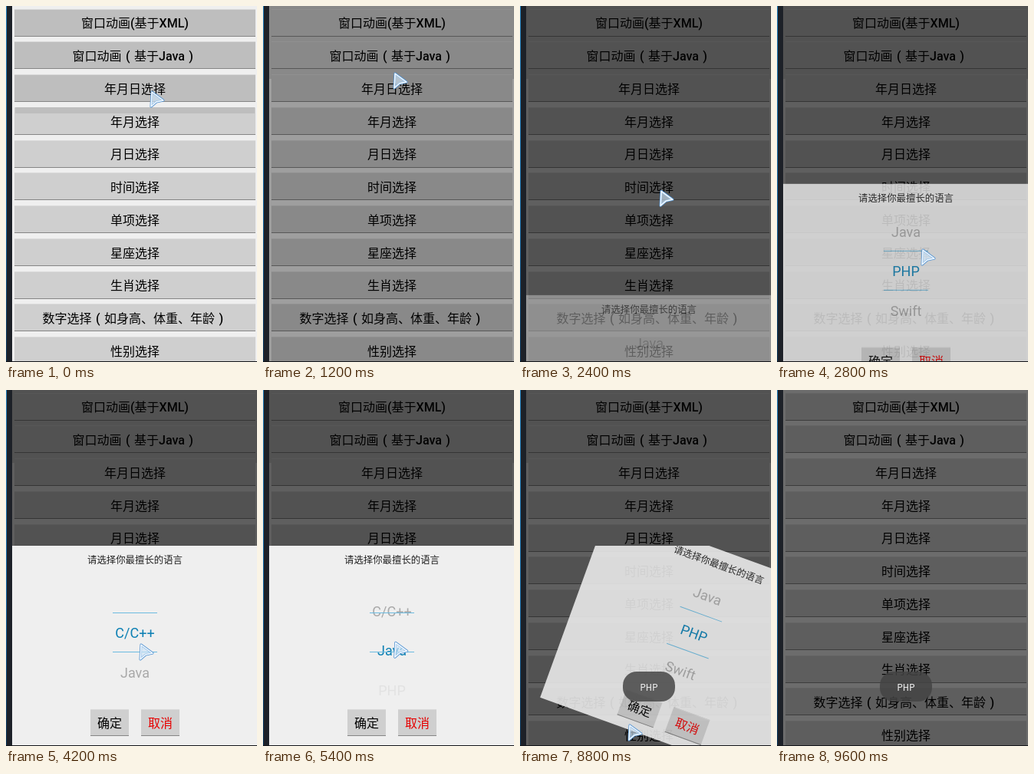
Write an HTML page with a canvas that moves like this. It is 327x464 px and loops after 9.8 s.

```html
<!DOCTYPE html>
<html lang="zh-CN">
<head>
<meta charset="utf-8">
<style>
html, body { margin: 0; width: 100%; height: 100%; overflow: hidden; background: #1d2128 }
canvas { display: block }
</style>
</head>
<body>
<canvas id="stage" width="327" height="464"></canvas>
<script>
const W = 327, H = 464, LOOP = 9800, STEP = 200;
const stage = document.getElementById('stage').getContext('2d');
const sheet = Object.assign(document.createElement('canvas'), { width: W, height: H }).getContext('2d');
const SANS = 'Roboto, "Noto Sans CJK SC", "Noto Sans CJK", sans-serif';
const menu = ['窗口动画(基于XML)', '窗口动画（基于Java）', '年月日选择', '年月选择', '月日选择',
  '时间选择', '单项选择', '星座选择', '生肖选择', '数字选择（如身高、体重、年龄）', '性别选择'];
const langs = ['C/C++', 'Java', 'PHP', 'Swift'];

// Pointer stops: time, x, y
const stops = [[0, 190, 111], [600, 172, 87], [1600, 172, 87], [2800, 190, 317], [4200, 176, 331],
  [6800, 169, 294], [7400, 143, 436], [8800, 143, 436], [9400, 150, 470]];

const clamp = v => Math.max(0, Math.min(1, v));
const ramp = (t, from, to) => clamp((t - from) / (to - from));

// Index of the language in the middle of the wheel
const wheelAt = t => 2 - 2 * ramp(t, 3300, 4200) + ramp(t, 4900, 5800) + ramp(t, 6150, 7000);

function pointerAt(t) {
  const i = stops.findIndex(s => s[0] > t);
  const [t0, x0, y0] = stops[i - 1], [t1, x1, y1] = stops[i], p = ramp(t, t0, t1);
  // Two upward drags, each after moving back down
  const drag = 60 * Math.abs(Math.sin(2 * Math.PI * ramp(t, 4200, 6800)));
  return [x0 + (x1 - x0) * p, y0 + (y1 - y0) * p + drag];
}

function rect(g, x, y, w, h, color) {
  g.fillStyle = color;
  g.fillRect(x, y, w, h);
}

function label(g, str, x, y, size, color, weight = 500, family = SANS) {
  g.font = `${weight} ${size}px ${family}`;
  g.textAlign = 'center';
  g.fillStyle = color;
  // Wide brackets are centred in their cell
  const text = str.replace('（', '\u2004(\u2004').replace('）', '\u2004)\u2004');
  g.fillText(text, x, y + size * .36);
}

function button(g, x, y, w, h, color) {
  rect(g, x, y, w, h, color);
  rect(g, x, y, w, 1, '#dadada');
  rect(g, x, y + h - 1, w, 1, '#858585');
}

function drawMenu(g, t) {
  rect(g, 8, 0, 319, H, '#efefef');
  if (t >= 1200 && t < 9400) rect(g, 8, 0, 319, 95, '#cfcfcf');
  menu.forEach((name, i) => {
    const shaded = t < 1000 && i < 3 && !(i === 1 && t >= 400);
    const y = Math.round(3.5 + i * 42.75);
    button(g, 11, y, 314, 36, shaded ? '#bebebe' : '#cfcfcf');
    if (i === 3 && t < 1000) rect(g, 12, y, 312, 8, '#bebebe');
    label(g, name, 168, 22.5 + i * 42.75, 16, '#000');
  });
  const dim = .6 * (ramp(t, 800, 1500) - ramp(t, 9580, 9800));
  rect(g, 8, 0, 319, H, `rgba(0,0,0,${dim})`);
}

function drawDialog(g, t) {
  rect(g, 8, 203, 319, 261, '#efefef');
  label(g, '请选择你最擅长的语言', 168, 222, 12.4, '#222');
  langs.forEach((name, i) => {
    const d = (i - wheelAt(t)) * 51.5, far = Math.abs(d);
    g.globalAlpha = clamp((77 - far) / 15);
    label(g, name, 168, 317 + d, 18, far < 25 ? '#0d80b4' : '#a9a9a9', 400);
  });
  g.globalAlpha = 1;
  for (const y of [290, 341]) rect(g, 139, y, 58, 1, '#6cbbe0');
  button(g, 110, 416, 50, 35, '#cfcfcf');
  button(g, 176, 416, 50, 35, '#cfcfcf');
  label(g, '确定', 135, 434, 16, '#000');
  label(g, '取消', 201, 434, 16, '#e60000');
}

// The dialog slides up while it fades in, then swings away while it fades out
function showDialog(t) {
  const enter = ramp(t, 2000, 3020), leave = ramp(t, 8250, 9500);
  if (!enter || leave === 1) return;
  sheet.clearRect(0, 0, W, H);
  sheet.save();
  sheet.beginPath();
  sheet.rect(8, 203, 319, 261);
  sheet.clip();
  sheet.translate(197, 484 + 261 * (1 + Math.cos(Math.PI * enter)) / 2);
  sheet.rotate(leave ** 2 * 1.8);
  sheet.translate(-197, -484);
  drawDialog(sheet, t);
  sheet.restore();
  stage.globalAlpha = enter * (1 - leave ** 2.5);
  stage.drawImage(sheet.canvas, 0, 0);
  stage.globalAlpha = 1;
}

function drawToast(g, t) {
  if (t < 8400) return;
  g.fillStyle = 'rgba(67,67,67,.835)';
  g.beginPath();
  g.roundRect(134, 367, 68, 39, 18);
  g.fill();
  label(g, 'PHP', 168, 387.5, 13, '#ececec', 400, '"Noto Sans Mono", monospace');
}

function drawPointer(g, t) {
  if (t >= 9400) return;
  g.save();
  g.translate(...pointerAt(t));
  g.beginPath();
  g.moveTo(0, 1);
  g.lineTo(15, 12);
  g.lineTo(6, 14);
  g.lineTo(-1, 20);
  g.closePath();
  g.lineJoin = 'round';
  g.strokeStyle = '#4f90d0';
  g.lineWidth = 3;
  g.stroke();
  g.fillStyle = 'rgba(205,228,248,.65)';
  g.fill();
  g.strokeStyle = '#f4faff';
  g.lineWidth = 1.5;
  g.stroke();
  g.restore();
}

function drawEdges(g) {
  rect(g, 0, 0, 8, H, '#1d2128');
  const blue = g.createLinearGradient(0, 0, 0, H);
  blue.addColorStop(0, '#2f8cc8');
  blue.addColorStop(.6, '#2378b4');
  blue.addColorStop(1, '#123a5c');
  rect(g, 0, 0, 1, H, blue);
  rect(g, 0, H - 1, W, 1, '#14161a');
}

function frame() {
  const t = Math.floor(performance.now() % LOOP / STEP) * STEP;
  drawMenu(stage, t);
  showDialog(t);
  drawToast(stage, t);
  drawPointer(stage, t);
  drawEdges(stage);
  requestAnimationFrame(frame);
}
frame();
</script>
</body>
</html>
```
